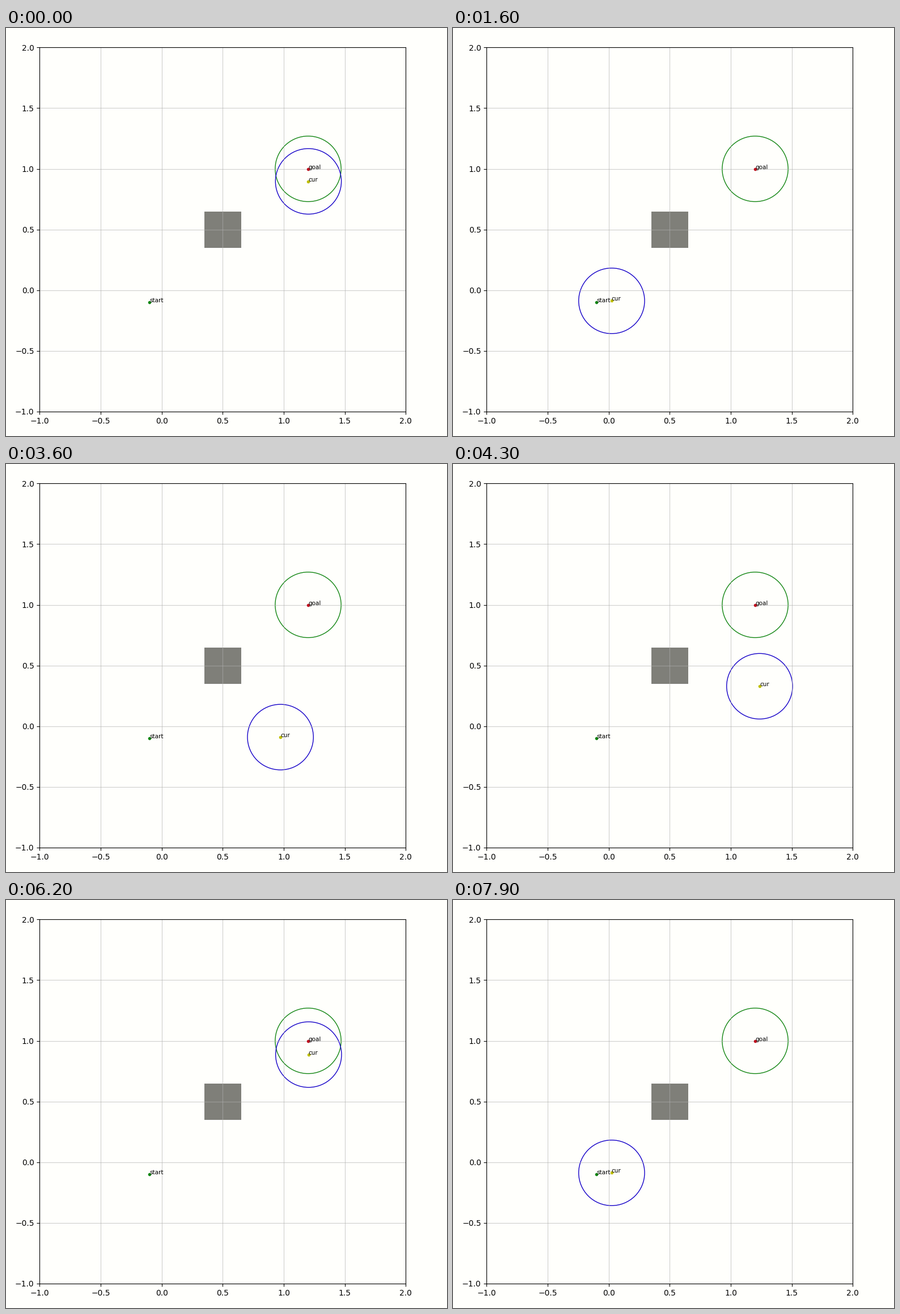
These frames come from a looping animation (778 px wide and 720 px high, 8000 ms). A matplotlib script:

```python
import numpy as np
import matplotlib.pyplot as plt
from matplotlib.animation import FuncAnimation
from matplotlib.patches import Circle, Rectangle

W, H, DPI = 778, 720, 100
FRAMES, INTERVAL = 80, 100
LEFT, RIGHT, TOP, BOTTOM = 59.3, 705.3, 34.4, 676.9
PAPER = "#fffffc"
GREEN, BLUE, RED, YELLOW = "#138613", "#1400c8", "#bf1220", "#bfbf00"

START = np.array([-0.1, -0.1])
GOAL = np.array([1.2, 1.0])
OBSTACLE = np.array([0.5, 0.5])
ATTRACTOR = np.array([1.186, 0.997])
BODY_RADIUS, SAFE_RADIUS = 0.27, 0.756

RUN_FRAMES, FIRST_FRAME = 63, 52
SLIDE_RATE, GLIDE_RATE, SETTLE_RATE = 0.1057, 0.096, 2.5

# The clock stalls briefly, lags, then catches up.
CLOCK_FRAMES = [0, 8, 9, 15, 18, 25, 63]
CLOCK_TIMES = [0, 7.5, 7.5, 13.3, 15.4, 24.1, 62.1]


def polar(vector):
    return np.hypot(*vector), np.arctan2(vector[1], vector[0])


def around_obstacle(radius, angle):
    return OBSTACLE + radius * np.array([np.cos(angle), np.sin(angle)])


def log_tan(angle):
    return np.log(np.tan(angle / 2))


# Angles around the obstacle are measured from the side opposite the goal.
far_side = polar(GOAL - OBSTACLE)[1] - np.pi
start_radius, start_angle = polar(START - OBSTACLE)
pull_radius, pull_angle = polar(ATTRACTOR - OBSTACLE)
leave_angle = pull_angle - np.arccos(SAFE_RADIUS / pull_radius)
leave_point = around_obstacle(SAFE_RADIUS, leave_angle)
start_log = log_tan(start_angle - far_side)
leave_time = (log_tan(leave_angle - far_side) - start_log) / SLIDE_RATE


def robot_position(frame):
    """Slide round the safety circle, then glide along its tangent."""
    run_frame = (frame + FIRST_FRAME) % RUN_FRAMES
    time = np.interp(run_frame, CLOCK_FRAMES, CLOCK_TIMES)
    if time > leave_time:
        remaining = np.exp(-GLIDE_RATE * (time - leave_time))
        return ATTRACTOR + (leave_point - ATTRACTOR) * remaining
    angle = far_side + 2 * np.arctan(np.exp(start_log + SLIDE_RATE * time))
    excess = (start_radius - SAFE_RADIUS) * np.exp(-SETTLE_RATE * time)
    return around_obstacle(SAFE_RADIUS + excess, angle)


fig = plt.figure(figsize=(W / DPI, H / DPI), dpi=DPI, facecolor=PAPER)
ax = fig.add_axes([LEFT / W, 1 - BOTTOM / H, (RIGHT - LEFT) / W,
                   (BOTTOM - TOP) / H], facecolor=PAPER)
ticks = np.arange(-1, 2.1, 0.5)
ax.set(xlim=(-1, 2), ylim=(-1, 2), xticks=ticks, yticks=ticks)
ax.grid(color="#b0b0b0", alpha=0.6, lw=0.8)


def add_marker(pos, color, name):
    dot, = ax.plot(*pos, ".", color=color, ms=6)
    label = ax.text(*pos, name, fontsize=7.5)
    return dot, label


def add_ring(pos, color):
    return ax.add_patch(Circle(pos, BODY_RADIUS, fill=False, ec=color, lw=1))


ax.add_patch(Rectangle(OBSTACLE - 0.15, 0.3, 0.3, fc="#7f7f79", ec="none"))
add_marker(START, GREEN, "start")
add_marker(GOAL, RED, "goal")
add_ring(GOAL, GREEN)
body = add_ring(START, BLUE)
cur_dot, cur_label = add_marker(START, YELLOW, "cur")


def update(frame):
    x, y = robot_position(frame)
    body.center = x, y
    cur_dot.set_data([x], [y])
    cur_label.set_position((x, y))
    return body, cur_dot, cur_label


anim = FuncAnimation(fig, update, frames=FRAMES, interval=INTERVAL,
                     repeat=True, repeat_delay=0)
plt.show()
```
